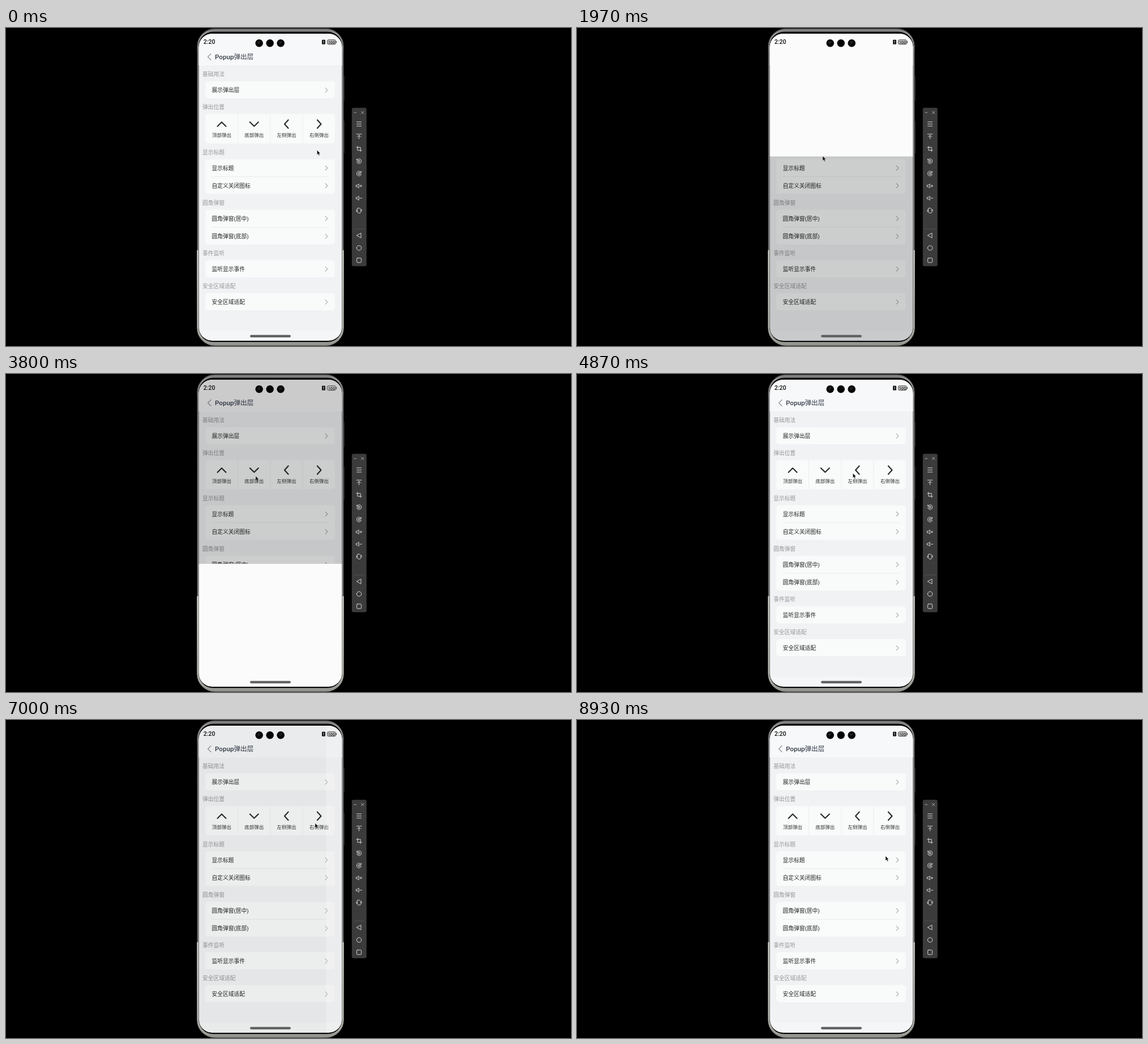
Write an HTML page that moves like this. It is 998 by 561 pixels and loops after 8.97 s.

```html
<!DOCTYPE html>
<html lang="zh-CN">
<head>
<meta charset="utf-8">
<title>Popup弹出层</title>
<style>
  html, body { margin: 0; width: 100%; height: 100%; overflow: hidden; background: #000; }
  svg { display: block; width: 998px; height: 561px; }
  text { font-family: Roboto, "Noto Sans CJK SC", "Noto Sans CJK", "Noto Sans", sans-serif; }
  .label { font-size: 9.75px; fill: #96989b; }
  .row { font-size: 9.75px; fill: #262728; }
  .cell { font-size: 8.5px; fill: #303132; text-anchor: middle; }
  .line { fill: none; stroke-linecap: round; stroke-linejoin: round; }
</style>
</head>
<body>
<svg viewBox="0 0 998 561" xmlns="http://www.w3.org/2000/svg">
  <defs>
    <clipPath id="screen"><rect x="340.5" y="10" width="253" height="541.5" rx="24"/></clipPath>
    <linearGradient id="metal" x1="0" y1="0" x2="0" y2="561" gradientUnits="userSpaceOnUse">
      <stop offset="0" stop-color="#6e6e6e"/>
      <stop offset=".02" stop-color="#a0a0a0"/>
      <stop offset=".08" stop-color="#8c8c8c"/>
      <stop offset=".699" stop-color="#8c8c8c"/>
      <stop offset=".699" stop-color="#bdbdb7"/>
      <stop offset=".96" stop-color="#b4b4ae"/>
      <stop offset="1" stop-color="#8f8f8a"/>
    </linearGradient>
    <linearGradient id="edge" x1="0" y1="0" x2="0" y2="561" gradientUnits="userSpaceOnUse">
      <stop offset="0" stop-color="#666"/>
      <stop offset=".08" stop-color="#2c2c2c"/>
      <stop offset=".699" stop-color="#2c2c2c"/>
      <stop offset=".699" stop-color="#c6c6c0"/>
      <stop offset="1" stop-color="#8a8a85"/>
    </linearGradient>
  </defs>
  <rect width="998" height="561"/>

  <g fill="#3a3a3a">
    <rect x="596.4" y="85" width="1.4" height="43"/>
    <rect x="596.4" y="164" width="1.4" height="57"/>
    <rect x="337" y="97" width="1" height="6"/>
  </g>
  <rect x="337.8" y="1.6" width="258.4" height="558.4" rx="31" fill="url(#metal)" stroke="url(#edge)" stroke-width="1.2"/>
  <rect x="340" y="6.5" width="254" height="547.5" rx="26" fill="#060606"/>

  <g clip-path="url(#screen)">
    <rect x="340" y="10" width="254" height="542" fill="#f0f2f4"/>
    <rect x="340" y="10" width="254" height="56" fill="#f7f8f9"/>
    <rect x="340" y="534" width="254" height="18" fill="#f5f6f7"/>
    <path class="line" d="M362 45.5L356.5 51L362 56.5" stroke="#8d8f93" stroke-width="1.1"/>
    <text x="369" y="55.2" font-size="11.6" font-weight="500" fill="#333a48">Popup弹出层</text>
    <g id="page"></g>
    <rect id="mask" x="340" y="10" width="254" height="542"/>
    <rect id="sheet" fill="#fbfbfb"/>
  </g>

  <text x="348.8" y="28.3" font-size="10.5" font-weight="500" fill="#111">2:20</text>
  <g id="cameras"></g>
  <rect x="558" y="20.8" width="6" height="8" rx="1" fill="#151515"/>
  <path d="M561 22.5v2.8M561 26.4v1" stroke="#fff" stroke-width="1"/>
  <rect x="567.4" y="20.8" width="15" height="8" rx="2.4" fill="#c2c2c2" stroke="#3a3a3a" stroke-width=".9"/>
  <path d="M583.6 23.3v3" stroke="#3a3a3a" stroke-width="1"/>
  <text x="574.9" y="27.5" font-size="7.2" font-weight="500" text-anchor="middle" fill="#222">100</text>
  <rect x="431" y="541.5" width="72" height="4.2" rx="2.1" fill="#5e5f60"/>

  <g id="tools"></g>
  <path id="cursor" d="M0 0V8L1.9 6.4L3.2 9.4L4.6 8.8L3.2 5.9L5.5 5.7Z" fill="#080808" stroke="#eee" stroke-width=".4"/>
</svg>
<script>
const LOOP = 8970, OPEN = 220;
const $ = id => document.getElementById(id);
const line = (d, color, w) => `<path class="line" d="${d}" stroke="${color}" stroke-width="${w}"/>`;
const card = (y, h) => `<rect x="352" y="${y}" width="229" height="${h}" rx="5" fill="#f9fafa"/>`;
const label = (y, s) => `<text class="label" x="347" y="${y + 3.7}">${s}</text>`;

function section(y, title, rows) {
  let out = label(y, title) + card(y + 12.4, rows.length * 31 - 0.8);
  rows.forEach((s, i) => {
    const cy = y + 28 + i * 31.2;
    if (i) out += line(`M363.5 ${cy - 16}H571`, '#e8e9ea', 0.8);
    out += `<text class="row" x="363.5" y="${cy + 3.8}">${s}</text>`;
    out += line(`M564.2 ${cy - 3.9}L567.8 ${cy}L564.2 ${cy + 3.9}`, '#75777a', 0.95);
  });
  return out;
}

function grid() {
  const cells = [
    ['顶部弹出', 'M-7.5 4L0 -3.4L7.5 4'],
    ['底部弹出', 'M-7.5 -3.6L0 3.8L7.5 -3.6'],
    ['左侧弹出', 'M3 -7.3L-3.6 0L3 7.3'],
    ['右侧弹出', 'M-3 -7.3L3.6 0L-3 7.3']
  ];
  return label(139.5, '弹出位置') + card(151.7, 52) + cells.map(([s, d], i) => {
    const x = 381 + i * 57.3;
    return `<g transform="translate(${x} 169.5)">${line(d, '#292a2b', 2.1)}</g>` +
      `<text class="cell" x="${x}" y="191.6">${s}</text>` +
      (i ? line(`M${x - 28.7} 152V203.5`, '#eceeef', 1) : '');
  }).join('');
}

$('page').innerHTML =
  section(81.5, '基础用法', ['展示弹出层']) + grid() +
  section(219, '显示标题', ['显示标题', '自定义关闭图标']) +
  section(308.3, '圆角弹窗', ['圆角弹窗(居中)', '圆角弹窗(底部)']) +
  section(397.4, '事件监听', ['监听显示事件']) +
  section(455.4, '安全区域适配', ['安全区域适配']);

$('cameras').innerHTML = [447.2, 466.2, 485.2].map((x, i) =>
  `<circle cx="${x}" cy="26.8" r="6.8" fill="#050505"/>` +
  (i === 1 ? '' : `<circle cx="${x - 1}" cy="26" r="2.4" fill="#1b1b1f"/><circle cx="${x + 1}" cy="24.4" r=".6" fill="#555"/>`)).join('');

// Emulator toolbar; icons are drawn around their own centre
const spin = 'M-3.6 -2.2A4.2 4.2 0 1 1 -4.1 .9M-4 -4V-2H-2M-1.4 -1.4H1.4V1.4H-1.4Z';
const speaker = 'M-4.8 -1.4H-3L-.4 -3.6V3.6L-3 1.4H-4.8Z';
const icons = [
  [169.3, 'M-4 -3.7H4M-4 0H4M-4 3.7H4'],
  [191.2, 'M-4.3 -4H4.3M0 4.4V-1.8M-3 1L0 -2L3 1'],
  [213.2, 'M-2.6 -4.6V2.6H4.6M-4.6 -2.6H2.6V4.6'],
  [235, spin],
  [256.8, spin, -1],
  [278.6, speaker + 'M1.5 0H5M3.25 -1.75V1.75'],
  [300.2, speaker + 'M1.5 0H5'],
  [322, 'M-2.2 -4.2H.8L3.2 -2V2.6L1.8 4.4H-1.2L-3.2 2V-2.6ZM-4.4 -1V2M4.4 -2V1'],
  [366.2, 'M3.4 -4V4L-4 0Z'],
  [388, 'M-4.2 0A4.2 4.2 0 1 1 4.2 0A4.2 4.2 0 1 1 -4.2 0Z'],
  [409.8, 'M-2.6 -4H2.6Q4 -4 4 -2.6V2.6Q4 4 2.6 4H-2.6Q-4 4 -4 2.6V-2.6Q-4 -4 -2.6 -4Z']
];
$('tools').innerHTML =
  '<rect x="610.8" y="140.8" width="26" height="279.4" rx="3" fill="#3b3b3b"/>' +
  line('M615 149.2H618.6M627.6 147L631.8 151.2M631.8 147L627.6 151.2', '#c8c8c8', 0.8) +
  line('M615 354.5H633', '#555', 0.8) +
  icons.map(([y, d, flip = 1]) =>
    `<g transform="translate(623.6 ${y}) scale(${flip} 1)">${line(d, '#dedede', 0.95)}</g>`).join('');

// Popups: side, opening time, closing time
const popups = [
  ['top', 1328, 2328],
  ['bottom', 3268, 4168],
  ['left', 5190, 6098],
  ['right', 6968, 8068]
];

// Cursor stops: time, x, y
const stops = [
  [0, 549.5, 215.5], [30, 549.5, 215.5], [200, 434, 209], [430, 434, 209], [1030, 384.5, 185.5],
  [1550, 384.5, 185.5], [1960, 434, 226], [2170, 437, 234], [2400, 437, 234], [3000, 441, 180],
  [3800, 441, 180], [3970, 463, 200.5], [4300, 463, 200.5], [4930, 488, 174.5],
  [5450, 488, 174.5], [5930, 524, 212], [6200, 524, 212], [6700, 546, 182],
  [7250, 546, 182], [7830, 420, 219], [8200, 420, 219], [8930, 545, 240], [LOOP, 545, 240]
];

const clamp = v => Math.max(0, Math.min(1, v));
const smooth = u => u * u * (3 - 2 * u);
const easeOut = u => u * (2 - u);

// Cubic curve (.25,.1) (.25,1), solved by bisection
function ease(x) {
  if (x <= 0 || x >= 1) return clamp(x);
  let a = 0, b = 1, s = 0.5;
  for (let i = 0; i < 20; i++) {
    s = (a + b) / 2;
    const v = 0.75 * s * (1 - s) + s ** 3;
    if (v < x) a = s; else b = s;
  }
  return 0.3 * s * (1 - s) ** 2 + 3 * s * s * (1 - s) + s ** 3;
}

function set(el, attrs) {
  for (const k in attrs) el.setAttribute(k, attrs[k]);
}

function sheetBox(side, p) {
  const L = 340.5, T = 10, R = 593.5, B = 551.5;
  const w = (R - L) * 0.6, h = (B - T) * 0.4;
  const wide = side === 'top' || side === 'bottom';
  return {
    x: side === 'left' ? L - w * (1 - p) : side === 'right' ? R - w * p : L,
    y: side === 'top' ? T - h * (1 - p) : side === 'bottom' ? B - h * p : T,
    width: wide ? R - L : w,
    height: wide ? h : B - T
  };
}

function draw(t) {
  let side = 'top', slide = 0, fade = 0;
  for (const [name, on, off] of popups) {
    if (t < on || t >= off + OPEN) continue;
    const closing = t >= off;
    const u = clamp((t - (closing ? off : on)) / OPEN);
    side = name;
    slide = closing ? 1 - ease(u) : ease(u);
    fade = closing ? 1 - easeOut(u) : easeOut(u);
  }
  set($('mask'), { opacity: 0.18 * fade });
  set($('sheet'), { ...sheetBox(side, slide), opacity: fade });

  let i = 0;
  while (i < stops.length - 2 && t >= stops[i + 1][0]) i++;
  const [t0, x0, y0] = stops[i], [t1, x1, y1] = stops[i + 1];
  const u = smooth(clamp((t - t0) / (t1 - t0)));
  set($('cursor'), { transform: `translate(${x0 + (x1 - x0) * u} ${y0 + (y1 - y0) * u})` });
}

const start = performance.now();
function tick() {
  draw((performance.now() - start) % LOOP);
  requestAnimationFrame(tick);
}
draw(0);
requestAnimationFrame(tick);
</script>
</body>
</html>
```
